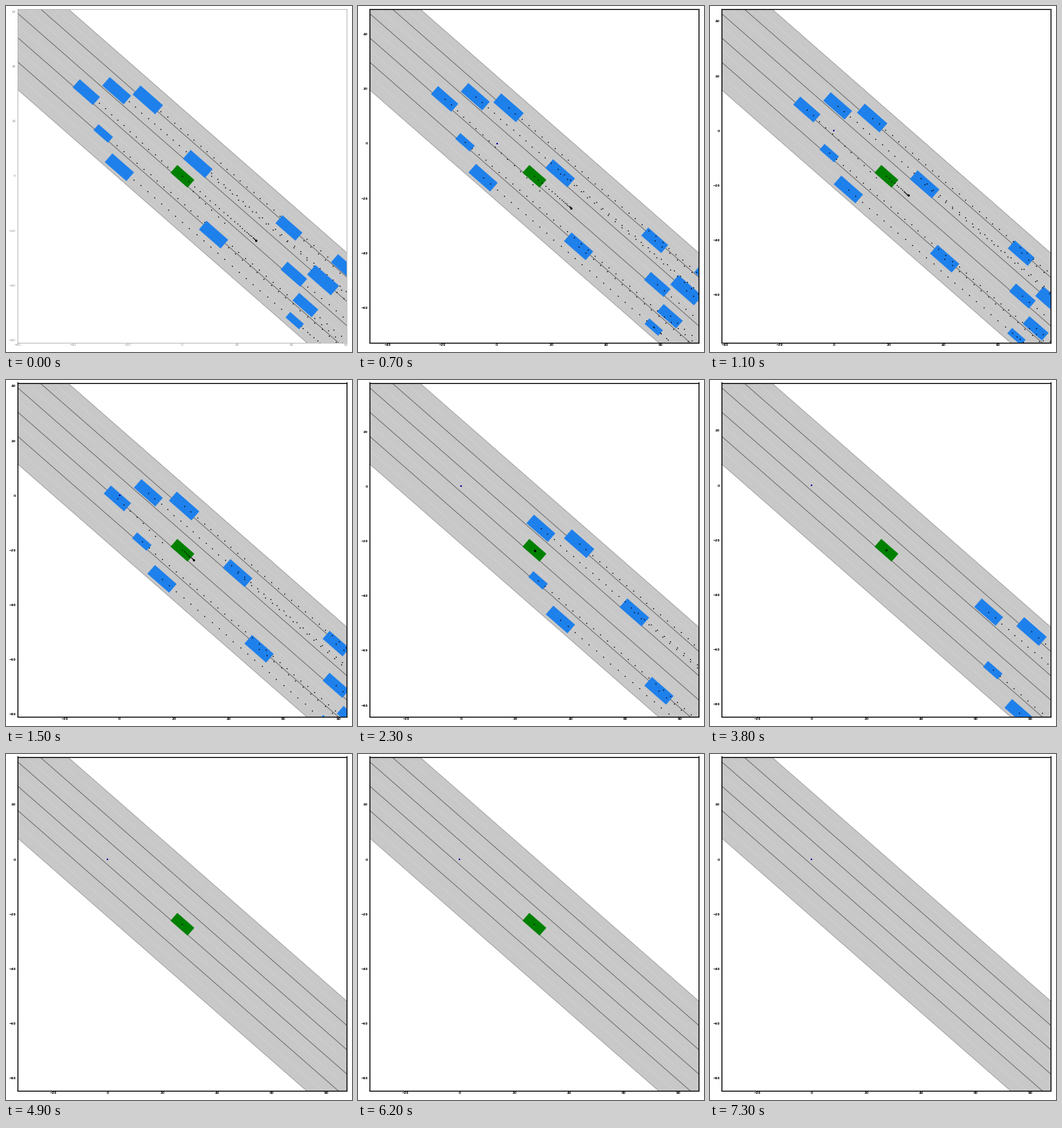
A matplotlib script for the animation above (7800 ms loop, 450x450 px).

```python
import numpy as np
import matplotlib.pyplot as plt
from matplotlib.animation import FuncAnimation
from matplotlib.patches import Polygon

SIZE, DPI = 450, 100
FRAMES, STEP = 78, 100
LEFT, RIGHT, TOP, BOTTOM = 15, 443, 4, 438
TICK = 71.2                  # pixels per 20 units
SLOPE = 0.875                # fall of the road on screen
HEADING = np.arctan(SLOPE)
LANE = 31.6                  # vertical distance between lane lines
ROAD_TOP = -66.3             # height of the upper road edge at x = 0
STOPPED, CRASH, LAST, EGO_END = 28, 22, 48, 73
START = np.array([229.5, 221.5])
TRAVEL = np.array([96.5, 83.8])
HOME = START - TRAVEL

# length, starting x, height off the ego lane, pixels per frame
CARS = [
    (35, -124.5, 0, 8.05),
    (37, -85, -36.5, 8.1),
    (39, -44.5, -60, 8.5),
    (25, -102.5, 34.5, 8.7),
    (37.5, -81.5, 60, 9.05),
    (38, 20.5, -33.5, 8.8),
    (37.5, 41, 40.5, 9.3),
    (34.5, 139, -54, 9.45),
    (34, 145.5, 0.5, 9.0),
    (41, 183.5, -25, 8.95),
    (35, 211.5, -66.5, 8.95),
    (33, 160.5, 27.5, 9.2),
    (23.5, 146.5, 60, 8.2),
]


def progress(n):
    """Braking of the ego car as a share of its travel."""
    return 1 - (1 - np.minimum(n / STOPPED, 1)) ** 2.42


def track(x0, lane, speed):
    """Positions on every frame; the car right behind swerves and crashes."""
    tailgater = lane == 0
    n = np.arange((CRASH if tailgater else LAST) + 1)
    x = x0 + speed * n + 0.005 * n ** 2
    drift = 0.027 * n ** 2 if tailgater else 0
    return np.column_stack([x, SLOPE * x + lane + drift])


def box(center, length, width):
    c, s = np.cos(HEADING), np.sin(HEADING)
    half = np.array([(-1, -1), (1, -1), (1, 1), (-1, 1)]) * (length / 2, width / 2)
    return half @ np.array([(c, s), (-s, c)]) + center


def patch(length, width, color, zorder):
    shape = Polygon(box(START + 0.5, length, width), fc=color, ec="none", zorder=zorder)
    return ax.add_patch(shape)


def points(size, color, zorder):
    return ax.plot([], [], "s", ms=size, mew=0, color=color, zorder=zorder)[0]


fig = plt.figure(figsize=(SIZE / DPI, SIZE / DPI), dpi=DPI, facecolor="white")
ax = fig.add_axes([(LEFT - 0.5) / SIZE, 1 - (BOTTOM - 0.5) / SIZE,
                   (RIGHT - LEFT) / SIZE, (BOTTOM - TOP) / SIZE])
ax.set_xlim(LEFT, RIGHT)
ax.set_ylim(BOTTOM, TOP)
ax.tick_params(length=0, pad=1.3, labelsize=3.1)

reach = np.array([-30, 490])
borders = np.append(np.arange(5), 5.14)
surface = ax.add_patch(Polygon(np.zeros((4, 2)), fc="#c8c8c8", ec="none", zorder=0))
road_lines = []
for k in np.concatenate([(borders[1:] + borders[:-1]) / 2, borders]):
    color = ("#909090" if k in borders[[0, -1]]
             else "#505050" if k in borders else "#d2d2d2")
    line, = ax.plot(reach, reach, color=color, lw=0.5, zorder=1)
    road_lines.append((line, k))

tracks = [track(*spec[1:]) for spec in CARS]
cars = [patch(spec[0], 0.4 * spec[0], "#1e80eb", 3) for spec in CARS]
ego = patch(29.5, 13.5, "#008000", 4)
ego_track = progress(np.arange(LAST + 1))[:, None] * TRAVEL
dots = points(0.9, "black", 5)
ego_dots = points(0.9, "black", 6)
origin_dot = points(1.5, "#1010a0", 3.5)


def road_y(k, shift):
    return ROAD_TOP + k * LANE + SLOPE * reach + shift


def set_ticks(origin, first):
    k = np.arange(-8, 9)
    for axis, zero, lo, hi, sign in ((ax.xaxis, origin[0], LEFT, RIGHT, 1),
                                     (ax.yaxis, origin[1], TOP, BOTTOM, -1)):
        pos = zero + sign * k * TICK
        keep = (pos >= lo - 0.5) & (pos <= hi + 0.5)
        axis.set_ticks(pos[keep], [f"{20 * v}".replace("-", "\u2212") for v in k[keep]])
        for label in axis.get_ticklabels():
            label.set_color("#909090" if first else "black")
            label.set_fontweight("normal" if first else "bold")


def draw(n):
    first = n == 0
    origin = START - TRAVEL * progress(n)

    for spine in ax.spines.values():
        spine.set_color("#b4b4b4" if first else "black")
        spine.set_linewidth(0.6 if first else 0.9)
    set_ticks(origin, first)

    shift = (origin - HOME) @ (-SLOPE, 1)
    for line, k in road_lines:
        line.set_ydata(road_y(k, shift))
    upper, lower = (np.column_stack([reach, road_y(k, shift)]) for k in borders[[0, -1]])
    surface.set_xy(np.vstack([upper, lower[::-1]]))

    ahead = []
    for car, path, spec in zip(cars, tracks, CARS):
        car.set_visible(n < len(path))
        ahead.append(path[n:] + origin)
        if n < len(path):
            car.set_xy(box(path[n] + origin, spec[0], 0.4 * spec[0]))
    dots.set_data(*np.vstack(ahead).T)
    dots.set_zorder(2 if first else 5)

    for artist in (ego, ego_dots):
        artist.set_visible(n < EGO_END)
    ego_dots.set_data(*(ego_track[min(n, LAST):] + origin).T)
    origin_dot.set_data([origin[0]], [origin[1]])
    return []


anim = FuncAnimation(fig, draw, frames=FRAMES, interval=STEP, init_func=lambda: draw(0),
                     repeat=True, repeat_delay=0, blit=False)
plt.show()
```
